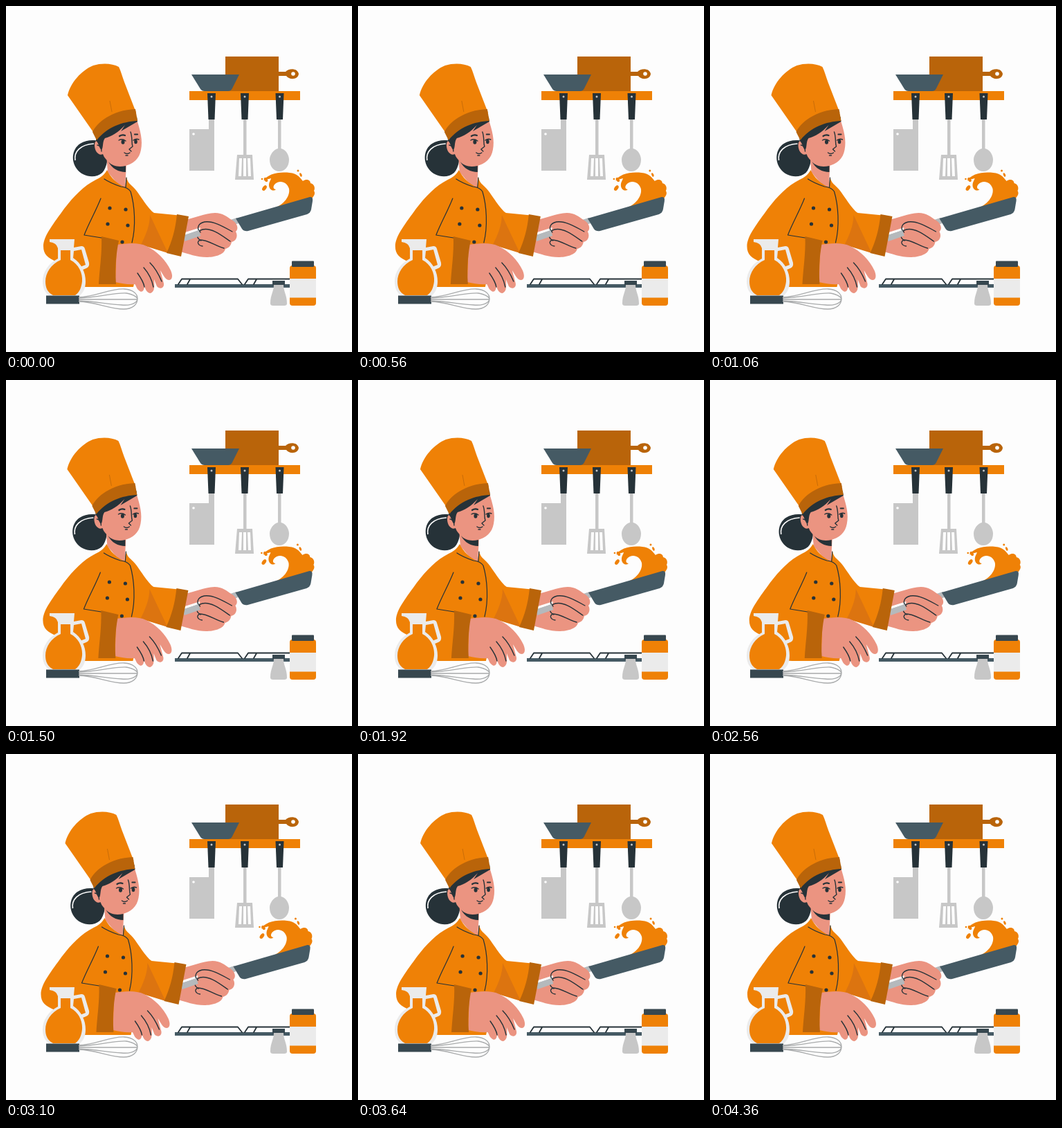
Recreate the animation shown at these times as an HTML page. Size 500 by 500 pixels, loop 4380 ms.

```html
<!DOCTYPE html>
<html lang="en">
<head>
<meta charset="utf-8">
<title>Chef with a pan</title>
<style>
html, body { margin: 0; width: 100%; height: 100%; overflow: hidden; background: #fdfdfd; }
svg { display: block; width: 100%; height: 100%; }
.o { fill: #ef8106; }
.d { fill: #b9640a; }
.k { fill: #263238; }
.t { fill: #455a64; }
.n { fill: #37474f; }
.g { fill: #c7c7c7; }
.c { fill: #ebebeb; }
.s { fill: #eb9481; }
.w { fill: #fdfdfd; }
.l { fill: none; stroke: #263238; stroke-width: 1.4; stroke-linecap: round; stroke-linejoin: round; }
.m { fill: none; stroke: #a9abac; stroke-width: 1.3; }
.h { fill: none; stroke: #b5b9bc; stroke-width: 8.5; }
</style>
</head>
<body>
<svg viewBox="0 0 500 500">
  <g id="shelf">
    <path class="d" d="M317 73H394V95H404C408 90 421 89 423 98C422 107 409 107 405 101H394V123H317Z"/>
    <circle class="w" cx="415" cy="98" r="2.800"/>
    <path class="t" d="M268 99H337L327 119Q325 123 321 123H287Q283 123 281 120Z"/>
    <path class="o" d="M265 123H425V136H265Z"/>
    <path class="g" d="M293 163H301V238H265V178H293ZM343 163H347.500V215H356L358 251H331L334 215H343ZM393 163H397.500V206C404 207 409 215 409 222C409 232 403 239 395 239C387 239 381 232 381 222C381 215 387 207 393 206Z"/>
    <circle class="w" cx="271" cy="185" r="1.800"/>
    <path class="w" d="M337 220H341L340 246H336ZM343 220H347V246H343ZM349 220H353L354 246H350Z"/>
    <g id="grips"></g>
  </g>

  <g id="stove">
    <path class="t" d="M244 402H411V407H244Z"/>
    <path class="l" d="M249 402L254 394.500H335L341 402M262 402L266 395M345 402L350 394.500H411M358 402L362 395" style="stroke-width:1.800"/>
  </g>

  <g id="chef">
    <!-- hair bun and neck -->
    <path class="k" d="M146 201C137 193 119 191 107 199C95 207 94 224 102 235C110 247 129 250 139 241C146 234 149 217 146 201Z"/>
    <path d="M100 223C98 211 107 200 127 199" fill="none" stroke="#fdfdfd" stroke-width="1.700"/>
    <path class="s" d="M145 215L147 240L158 253L172 265L174 228Z"/>
    <path class="k" d="M148 225C154 232 163 233 173 231L173 240C163 240 153 235 148 225Z"/>

    <!-- jacket -->
    <path class="o" d="M146 237C142 244 137 248 130 251C112 260 98 275 84 293C70 313 54 332 54 347C54 359 60 364 74 370L100 402Q106 406 116 406H184L197 345L240 358L255 303L214 299C205 293 194 273 186 264C181 258 176 257 174 247L172 262C161 257 151 248 146 237Z"/>
    <path fill="#dc7410" d="M208 302C208 318 201 333 195 345L234 357Z"/>
    <path class="l" d="M142 250Q151 256 166 261Q176 262 180 268C186 288 188 318 182 342M137 278C130 296 120 313 113 331L138 335M174 248L173 262" style="stroke-width:1.200"/>
    <g id="buttons" class="k"></g>

    <!-- sauce, pan and right hand -->
    <path class="o" d="M385 293C402 288 411 274 409 264C406 253 394 251 388 258C385 262 387 265 390 265C386 269 380 265 380 259C380 254 383 251 383 249C378 251 375 250 372 253C377 243 394 239 410 241C421 242 424 247 429 253C435 249 440 252 440 256C446 257 447 264 445 267C448 272 444 275 441 280Z"/>
    <ellipse class="o" cx="375.500" cy="251" rx="2.200" ry="3.500" transform="rotate(-35 375.500 251)"/>
    <ellipse class="o" cx="373.500" cy="263" rx="2.600" ry="4.400" transform="rotate(35 373.500 263)"/>
    <circle class="o" cx="370" cy="250" r="1.300"/>
    <circle class="o" cx="422" cy="238" r="1.500"/>
    <ellipse class="o" cx="426" cy="244" rx="1.500" ry="3" transform="rotate(-25 426 244)"/>
    <path class="h" d="M259 335L335 310"/>
    <path class="t" d="M332 307L439 276Q444 275 443 282L441 294Q440 299 435 301L350 325Q344 326 341 322Z"/>
    <path class="s" d="M259 309C274 306 286 300 302 299C313 299 320 305 326 309C334 313 337 322 332 326C336 333 332 340 326 341C325 347 321 350 317 351C315 360 300 363 290 363C276 363 263 358 252 355L257 337L278 331L281 320L259 327Z"/>
    <path class="l" d="M327 326C316 320 300 310 287 312C277 314 275 322 281 327M324 340C311 331 297 320 284 323C274 326 274 335 282 339M315 350C303 347 292 338 281 338C275 340 277 346 284 347"/>
    <path class="h" d="M257 336L280 328"/>
    <path class="d" d="M247 301L264 304L253 362L232 357C240 340 245 322 247 301Z"/>

    <!-- left hand -->
    <path class="s" d="M160 345C174 343 191 341 203 347C218 354 231 367 238 382C241 389 241 395 236 396C230 396 227 388 223 382L228 401C229 408 222 410 218 405L214 395C215 408 214 413 209 415C203 415 201 408 200 404C200 412 196 415 192 411C188 408 188 403 186 402C177 403 168 401 158 399Z"/>
    <path class="l" d="M208 371C214 377 220 386 225 398M199 378C206 386 211 396 213 406M190 386C195 393 199 400 200 406"/>
    <path class="d" d="M138 333L163 339C160 354 157 374 159 402L134 402C135 380 139 358 138 333Z"/>

    <!-- head -->
    <path class="s" d="M140 190C135 193 128 193 128 201C128 210 134 217 140 214C144 226 158 232 171 231C184 229 193 220 195 208C198 194 194 180 189 164L150 172Z"/>
    <path class="k" d="M130 190L141 177L189 160L190 167C182 172 174 176 166 181L172 172C163 182 152 189 143 191C139 196 141 205 138 208C134 205 134 197 130 195Z"/>
    <path class="l" d="M132 201Q138 202 138 210M180 182C183 190 181 197 183 203L178 207L181 210M171 212Q175 215 179 212M173 216L176 216"/>
    <path class="l" d="M164 188Q168 185.500 172 187M186 185.500L190 185.500" style="stroke-width:2.200"/>
    <ellipse class="k" cx="169" cy="196.500" rx="2.500" ry="3.300"/>
    <ellipse class="k" cx="187.500" cy="196" rx="2.300" ry="3.300"/>
    <path class="l" d="M163 194Q168 191 173 195M184 194Q188 191 192 193"/>

    <!-- hat -->
    <path class="o" d="M89 129C93 111 109 93 126 86C139 82 154 83 163 88C166 94 168 102 171 110L188 154L128 185Z"/>
    <path d="M150 137L153 153" fill="none" stroke="#c96d08" stroke-width="1"/>
    <path class="d" d="M125 182C131 169 153 150 187 149L190 166C168 167 146 175 131 194Z"/>
  </g>

  <g id="table">
    <path class="c" d="M63 337H99L98 349L109 347Q113 347 114 351L120 371Q121 377 116 379L104 384L102 379L115 374L109 352L98 354L97 364C109 372 115 385 115 398C115 407 112 414 107 418H62C56 414 53 407 53 398C53 385 61 372 75 365L75 350Q73 342 63 341Z"/>
    <path class="o" d="M79 353H93V367C105 373 111 386 110 398C109 407 106 414 100 418H68C60 414 57 407 57 398C57 386 65 373 79 367Z"/>
    <path class="n" d="M58 418.500H106V430.500H58Z"/>
    <path class="m" d="M105 421C130 420 150 408 171 409C184 410 190 416 190 423C190 432 182 438 170 438C150 438 131 428 105 427M105 422C135 421 155 414 174 415C185 417 190 421 190 424C188 431 176 433 167 432C147 431 130 427 105 426M105 424H190"/>
    <path class="n" d="M385 397H403V404H385Z"/>
    <path class="g" d="M387 403H401C401 413 406 417 406 430Q406 433 402 433H386Q382 433 382 430C382 417 387 413 387 403Z"/>
    <rect class="o" x="410" y="375" width="38" height="58" rx="4"/>
    <path class="c" d="M410 394H448V421.500H410Z"/>
    <rect class="n" x="413" y="368.500" width="32" height="8.500" rx="1"/>
  </g>
</svg>
<script>
const LOOP = 4380;
const SHAKE = [0, -1, 2, -4, 4, -4, 4, -4, 2, -1, 0];
const $ = id => document.getElementById(id);

$('grips').innerHTML = [297, 345, 395.5].map(x =>
  `<path class="k" d="M${x - 6} 126H${x + 6}L${x + 4.5} 164H${x - 4.5}Z"/>` +
  `<circle class="g" cx="${x}" cy="131" r="1.5"/>`).join('');

$('buttons').innerHTML = [[150, 292], [173, 294], [147, 315], [176, 317], [168, 341]]
  .map(([x, y]) => `<circle cx="${x}" cy="${y}" r="2.6"/>`).join('');

// Uneven frame holds: a repeating 540 ms beat of short and long steps.
function hold(t) {
  if (t < 20) return 0;
  const u = (t - 20) % 540, base = t - u;
  if (u < 40) return base + Math.floor(u / 20) * 20;
  const v = (u - 40) % 120;
  return base + u - v + (v < 100 ? 0 : 100);
}

// Linear side-to-side shake, one key every tenth of the loop.
function offset(t) {
  const p = t / LOOP * 10, i = Math.floor(p);
  return SHAKE[i] + (SHAKE[i + 1] - SHAKE[i]) * (p - i);
}

const chef = $('chef');
const start = performance.now();

function draw(now) {
  const t = Math.max(0, now - start) % LOOP;
  chef.setAttribute('transform', `translate(${offset(hold(t)).toFixed(3)} 0)`);
  requestAnimationFrame(draw);
}
draw(start);
</script>
</body>
</html>
```
